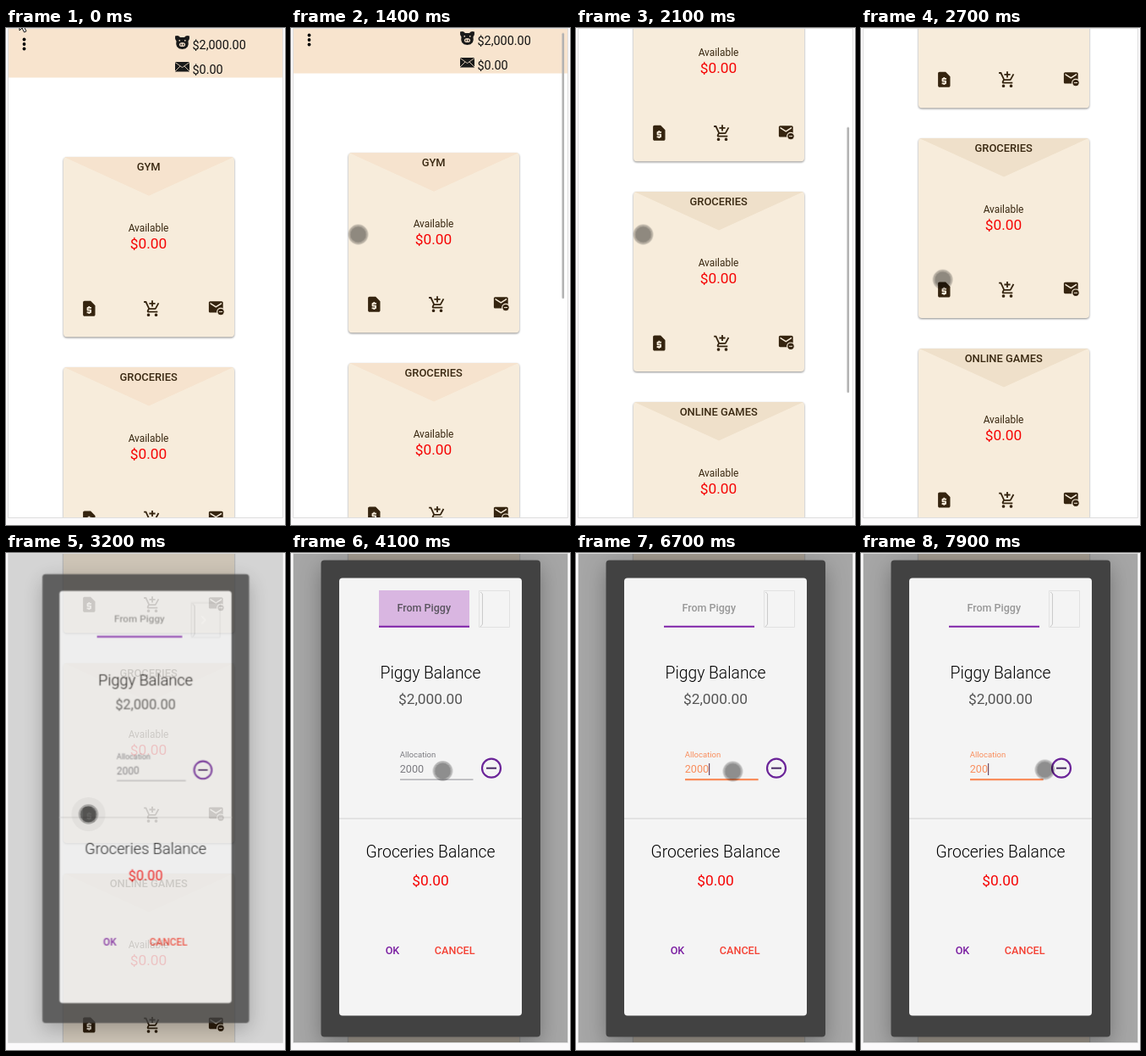
These frames come from a looping animation (330x586 px, 8000 ms). An HTML page:

```html
<!DOCTYPE html>
<html lang="en">
<head>
<meta charset="utf-8">
<title>Budget envelopes</title>
<style>
@property --s { syntax: "<number>"; inherits: true; initial-value: 0; }

html, body { margin: 0; width: 100%; height: 100%; overflow: hidden; background: #fbfafb; }
svg { display: block; width: 330px; height: 586px; font-family: Roboto, Arial, sans-serif; }
text { fill: #3a2912; }
.mid { text-anchor: middle; }
.bold { font-weight: 500; }
.title { font-size: 12.9px; }
.money { font-size: 17.3px; }
.head { font-size: 14.4px; fill: #111; }
.big { font-size: 19.3px; font-weight: 300; fill: #000; }
.small { font-size: 12.6px; }
.red { fill: #f50505; }

/* every track shares one 8 s clock and holds between its stops */
.anim, .anim * { animation: 8s step-end infinite; }
#view { animation-name: scroll; }
#page { animation-name: flap; transform: translateY(calc(var(--s) * -1px)); }
#bar { animation-name: bar; transform: translateY(calc(var(--s) * .5495px)); }
#arrow { animation-name: arrow; }
#cursor { animation-name: cursor; }
#dot { animation-name: press; }
#ripple { animation-name: ripple; }
#shade { animation-name: shade; }
#dialog { animation-name: open; transform-origin: 165px 289px; }
#frame { filter: drop-shadow(0 8px 13px rgba(0, 0, 0, .3)); }
#chevron { animation-name: chevron; }
#glow { animation-name: glow; }
#tab { animation-name: tab; }
.field { animation-name: field; }
#line { animation-name: line; transform-origin: 172px 267px; }
#last { animation-name: last; }
#caret { animation-name: caret; }
.card { filter: drop-shadow(0 1.3px .8px rgba(0, 0, 0, .45)); }

@keyframes scroll {
  0% { --s: 0; }
  17.5% { --s: 5; }
  18.75% { --s: 48; }
  20% { --s: 105; }
  23.75% { --s: 150; animation-timing-function: steps(2); }
  26.25% { --s: 207; animation-timing-function: steps(4); }
  31.25%, 100% { --s: 270; }
}
@keyframes flap {
  0% { color: #f6e3ce; }
  18.75%, 100% { color: #efe0ca; }
}
@keyframes bar {
  0% { opacity: 0; }
  17.5% { opacity: 1; }
  31.25% { opacity: 1; animation-timing-function: steps(2); }
  33.75%, 100% { opacity: 0; }
}
@keyframes arrow {
  0% { opacity: 1; }
  7.5%, 100% { opacity: 0; }
}
@keyframes cursor {
  0% { transform: translate(-40px, -40px); }
  7.5% { transform: translate(28px, 36px); animation-timing-function: steps(6); }
  15% { transform: translate(79.5px, 243.5px); }
  31.25% { transform: translate(84px, 258px); animation-timing-function: steps(3); }
  35% { transform: translate(103px, 316px); }
  37.5% { transform: translate(97.5px, 308px); }
  45% { transform: translate(115px, 297px); animation-timing-function: steps(3); }
  48.75% { transform: translate(167px, 264.5px); }
  51.25% { transform: translate(179.5px, 257px); }
  57.5% { transform: translate(181px, 257px); animation-timing-function: steps(5); }
  63.75% { transform: translate(185.5px, 257.5px); }
  98.75%, 100% { transform: translate(217.5px, 255.5px); }
}
@keyframes press {
  0% { fill-opacity: .42; }
  37.5% { fill-opacity: .57; }
  41.25%, 100% { fill-opacity: .42; }
}
@keyframes ripple {
  0% { opacity: 0; transform: scale(.6); }
  37.5% { opacity: .07; transform: scale(.7); }
  38.75% { opacity: .07; transform: scale(.9); }
  40% { opacity: .04; transform: none; }
  41.25%, 100% { opacity: 0; }
}
@keyframes shade {
  0% { opacity: 0; }
  40% { opacity: .17; }
  41.25%, 100% { opacity: .35; }
}
@keyframes open {
  0% { opacity: 0; transform: scale(.7); }
  40% { opacity: .8; transform: scale(.942); }
  41.25%, 100% { opacity: 1; transform: none; }
}
@keyframes chevron {
  0% { opacity: 1; }
  41.25%, 100% { opacity: 0; }
}
@keyframes glow {
  0% { opacity: 0; }
  41.25% { opacity: 1; }
  71.25%, 100% { opacity: 0; }
}
@keyframes tab {
  0% { fill: #949494; }
  41.25% { fill: #5b5560; }
  71.25%, 100% { fill: #989898; }
}
@keyframes field {
  0% { fill: #7b7b80; }
  71.25%, 100% { fill: #f98d5c; }
}
@keyframes line {
  0% { transform: scaleX(0); }
  71.25% { transform: scaleX(.3); animation-timing-function: steps(4); }
  76.25%, 100% { transform: none; }
}
@keyframes last {
  0% { opacity: 1; }
  86.25%, 100% { opacity: 0; }
}
@keyframes caret {
  0% { opacity: 0; transform: translateX(7px); }
  71.25% { opacity: 1; transform: translateX(7px); }
  77.5% { opacity: 0; transform: translateX(7px); }
  83.75% { opacity: 1; transform: translateX(7px); }
  86.25% { opacity: 1; transform: none; }
  92.5% { opacity: 0; transform: none; }
  98.75%, 100% { opacity: 1; transform: none; }
}
</style>
</head>
<body>
<svg viewBox="0 0 330 586">
  <defs>
    <clipPath id="stage"><path d="M3 1H327V577H3Z"/></clipPath>

    <g id="card">
      <rect class="card" width="202" height="212" rx="4" fill="#f7ecdb"/>
      <path d="M1 0H201L101 45.500Z" fill="currentColor"/>
      <text class="mid" x="100.500" y="88" font-size="11.900">Available</text>
      <text class="mid money red" x="100.500" y="107.500">$0.00</text>
      <g fill="#35240f">
        <path transform="translate(19.500 167.700) scale(.9)" fill-rule="evenodd" d="M14 2H6C4.900 2 4 2.900 4 4V20c0 1.100.9 2 2 2H18c1.100 0 2-.9 2-2V8ZM15 12h-4v1h3c.55 0 1 .45 1 1v3c0 .55-.45 1-1 1h-1v1h-2v-1H9v-2h4v-1h-3c-.55 0-1-.45-1-1v-3c0-.55.45-1 1-1h1V9h2v1h2Z"/>
        <path transform="translate(94.200 168) scale(.9)" d="M11 9h2V6h3V4h-3V1h-2v3H8v2h3ZM7.170 14.750l.03-.12.9-1.630h7.450c.75 0 1.410-.41 1.750-1.030l3.860-7.010L19.420 4l-3.870 7H8.530L4.270 2H1v2h2l3.600 7.590-1.350 2.450C4.500 15.400 5.500 17 7 17h12v-2H7.420c-.13 0-.25-.11-.25-.25ZM7 18a2 2 0 1 0 .01 0ZM17 18a2 2 0 1 0 .01 0Z"/>
        <path transform="translate(170.200 166.500) scale(.84)" d="M20 4H4c-1.100 0-2 .9-2 2v12c0 1.100.9 2 2 2h16c1.100 0 2-.9 2-2V6c0-1.100-.9-2-2-2Zm0 4l-8 5-8-5V6l8 5 8-5Z"/>
        <circle cx="186" cy="182.300" r="4.300" stroke="#f7ecdb" stroke-width="1.200"/>
        <path d="M184 181.800h4v1h-4Z" fill="#f7ecdb"/>
      </g>
    </g>
  </defs>

  <g clip-path="url(#stage)">
    <path d="M3 1H327V577H3Z" fill="#fff"/>
    <g id="view" class="anim">
      <g id="page">
        <path d="M3 1H327V58.500H3Z" fill="#f8e4ce"/>
        <g id="menu">
          <circle cx="21.500" cy="13.500" r="1.900"/>
          <circle cx="21.500" cy="19" r="1.900"/>
          <circle cx="21.500" cy="24.500" r="1.900"/>
        </g>
        <g id="pig">
          <path d="M200 9.500q4-1.500 6 1.500h5q2-3 6-1.500q.5 4-1.500 6q2 9-7 9.500q-9-.5-7-9.500q-2-2-1.500-6Z" fill="#1a1a1a"/>
          <ellipse cx="208.500" cy="19.500" rx="3.600" ry="2.600" fill="#e8d5c0"/>
          <path d="M204.500 14h1.500v1.500h-1.500ZM211 14h1.500v1.500H211Z" fill="#e8d5c0"/>
          <path d="M206.500 18.700h1.200v1.800h-1.200ZM209.300 18.700h1.200v1.800h-1.200Z"/>
        </g>
        <path d="M200 40H217V51.500H200Z" fill="#1a1a1a"/>
        <path d="M200 40.500l8.500 6 8.500-6M200 51l6-6M217 51l-6-6" fill="none" stroke="#e8d5c0" stroke-width=".9"/>
        <text class="head" x="220.500" y="25">$2,000.00</text>
        <text class="head" x="220.500" y="54">$0.00</text>

        <use href="#card" x="68" y="152.300"/>
        <use href="#card" x="68" y="400"/>
        <use href="#card" x="68" y="648"/>
        <g class="mid bold title">
          <text x="168.700" y="168">GYM</text>
          <text x="168.700" y="416">GROCERIES</text>
          <text x="168.700" y="664">ONLINE GAMES</text>
        </g>
      </g>
      <rect id="bar" x="320.500" y="3.200" width="2.600" height="313" rx="1" fill="#b2b2b2"/>
    </g>

    <g class="anim">
      <path id="shade" d="M3 1H327V577H3Z"/>
      <g id="dialog">
        <rect id="frame" x="35.500" y="8.500" width="259.500" height="562" rx="4" fill="#424242"/>
        <rect x="57" y="29.500" width="216" height="516" rx="4" fill="#f4f4f4"/>

        <path id="glow" d="M104 44H211V88H104Z" fill="#d9b6e1"/>
        <path d="M104 85.800H211V87.800H104Z" fill="#7f22a8"/>
        <text id="tab" class="mid bold" x="157.300" y="69" font-size="12.500">From Piggy</text>
        <path d="M222.500 44.500H258.500V87.500H222.500Z" fill="#f4f4f4" stroke="#e1e1e1"/>
        <path d="M224 46l2.500 2V84l-2.500 3" fill="none" stroke="#cbcbcb"/>
        <path id="chevron" d="M235 61l5 5-5 5" fill="none" stroke="#fff" stroke-width="1.500"/>

        <text class="big mid" x="165" y="148">Piggy Balance</text>
        <text class="money mid" x="165" y="178" style="fill:#555">$2,000.00</text>

        <text class="field" x="128.800" y="240.500" font-size="9.500">Allocation</text>
        <text class="field small" x="128.800" y="259">200<tspan id="last">0</tspan></text>
        <path d="M129 266.500H215.500V267.700H129Z" fill="#a3a3a8"/>
        <path id="line" d="M129 266H215.500V268.200H129Z" fill="#f98d5c"/>
        <path id="caret" d="M150 248h1.200v14h-1.200Z" fill="#6b4a66"/>

        <circle cx="237" cy="253.700" r="11" fill="none" stroke="#6a2398" stroke-width="2.200"/>
        <path d="M231 252.700h12v2h-12Z" fill="#4a2a66"/>
        <path d="M57 312.500H273V313.700H57Z" fill="#d8d8d8"/>

        <text class="big mid" x="165" y="359">Groceries Balance</text>
        <text class="money mid red" x="165" y="392">$0.00</text>
        <text class="small bold mid" x="120" y="473" style="fill:#7b1fa2">OK</text>
        <text class="small bold mid" x="193.700" y="473" style="fill:#f44336">CANCEL</text>
      </g>
    </g>
  </g>

  <path d="M2.500 .5H327.500V577.500H2.500Z" fill="none" stroke="#dedede"/>

  <g class="anim">
    <path id="arrow" d="M16-10V3l3-3 2.500 5 2.500-1.200L21.500-1H26Z" fill="#fff" stroke="#111"/>
    <g id="cursor">
      <circle id="ripple" r="20"/>
      <circle r="10.700" fill="none" stroke="#000" stroke-opacity=".26" stroke-width="2"/>
      <circle id="dot" r="9.700"/>
    </g>
  </g>
</svg>
</body>
</html>
```
